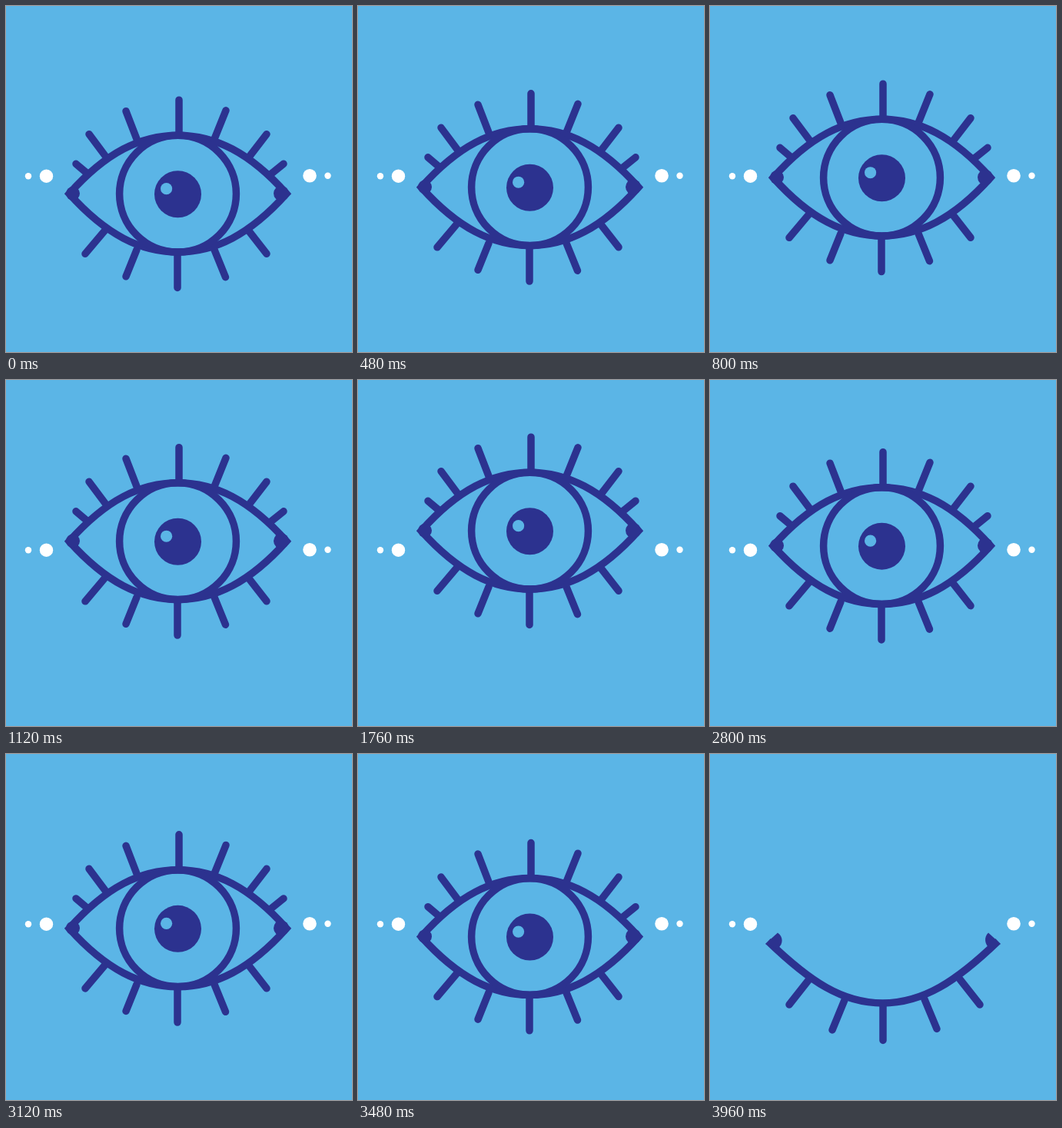
Recreate the animation shown at these times as an HTML page. Size 450 by 450 pixels, loop 4000 ms.

```html
<!DOCTYPE html>
<html lang="en">
<head>
<meta charset="utf-8">
<title>Blinking eye</title>
<style>
html, body { margin: 0; width: 100%; height: 100%; overflow: hidden; background: #5bb5e6; }
svg { display: block; width: 100%; height: 100%; }
.line { fill: none; stroke: #2c328f; stroke-width: 9.5; stroke-miterlimit: 10; }
.lash { stroke-linecap: round; }
.ink { fill: #2c328f; }
</style>
</head>
<body>
<svg viewBox="0 0 450 450">
  <g fill="#fff">
    <circle cx="29" cy="221.2" r="4.2"/>
    <circle cx="52.5" cy="221.2" r="8.7"/>
    <circle cx="395" cy="220.8" r="8.8"/>
    <circle cx="418.5" cy="220.8" r="4.2"/>
  </g>
  <g id="eye">
    <g id="open">
      <path class="line lash" d="M225 122.2V166M156 136.7L170 173M286 135.8L271 173M108 166.7L131 197.500M339 166.7L316 196.500M91 205.3L106 218M361 205.3L344 219"/>
      <path class="line lash" d="M103 322.3L129 291.500M156 351.8L170 317M223 366.5V323M285.500 352.7L271 317M339 322.2L315 291.500"/>
      <path class="line" d="M82.200 244.200C130 190.500 175 168.200 223.500 168.200C272 168.200 317 190.500 364.800 244.200C317 297.500 272 320 223.500 320C175 320 130 297.500 82.200 244.200Z"/>
      <circle class="line" cx="223.500" cy="244.200" r="75.900"/>
      <circle class="ink" cx="87" cy="243.800" r="9"/>
      <circle class="ink" cx="358" cy="243.800" r="10"/>
      <circle class="ink" cx="223.500" cy="244.700" r="30.500"/>
      <circle fill="#5bb5e6" cx="208.600" cy="237.700" r="7.600"/>
    </g>
    <g id="closed">
      <path class="line" d="M75.500 243.500C130 296 172 324 224.500 324C277 324 320 296 374.500 243.500"/>
      <path class="line lash" d="M103 326L129 293M159 359L175 320M225 372.500V325M295 357.500L279 319M351 326L325 293"/>
      <path class="ink" d="M72 247L88 232.500C95 237 96 247 88 253Z"/>
      <path class="ink" d="M378 247L362 232.500C356 238 357 248 364 253Z"/>
    </g>
  </g>
</svg>
<script>
const LOOP = 4000, RISE = 48, TOP_IN = 1740, TOP_OUT = 1860;
const BLINK_EVERY = 1680, BLINK_FIRST = 560, BLINK_FOR = 80;
const [eye, open, closed] = ['eye', 'open', 'closed'].map(id => document.getElementById(id));
const ease = p => (1 - Math.cos(Math.PI * Math.min(1, Math.max(0, p)))) / 2;
const show = (el, on) => el.setAttribute('visibility', on ? 'visible' : 'hidden');

function draw(t) {
  const lift = ease(t / TOP_IN) - ease((t - TOP_OUT) / (LOOP - TOP_OUT));
  const blink = t >= BLINK_FIRST && (t - BLINK_FIRST) % BLINK_EVERY < BLINK_FOR;
  eye.setAttribute('transform', `translate(0 ${(-RISE * lift).toFixed(2)})`);
  show(open, !blink);
  show(closed, blink);
}

let start;
function tick(now) {
  start ??= now;
  draw(Math.max(0, now - start) % LOOP);
  requestAnimationFrame(tick);
}
draw(0);
requestAnimationFrame(tick);
</script>
</body>
</html>
```
